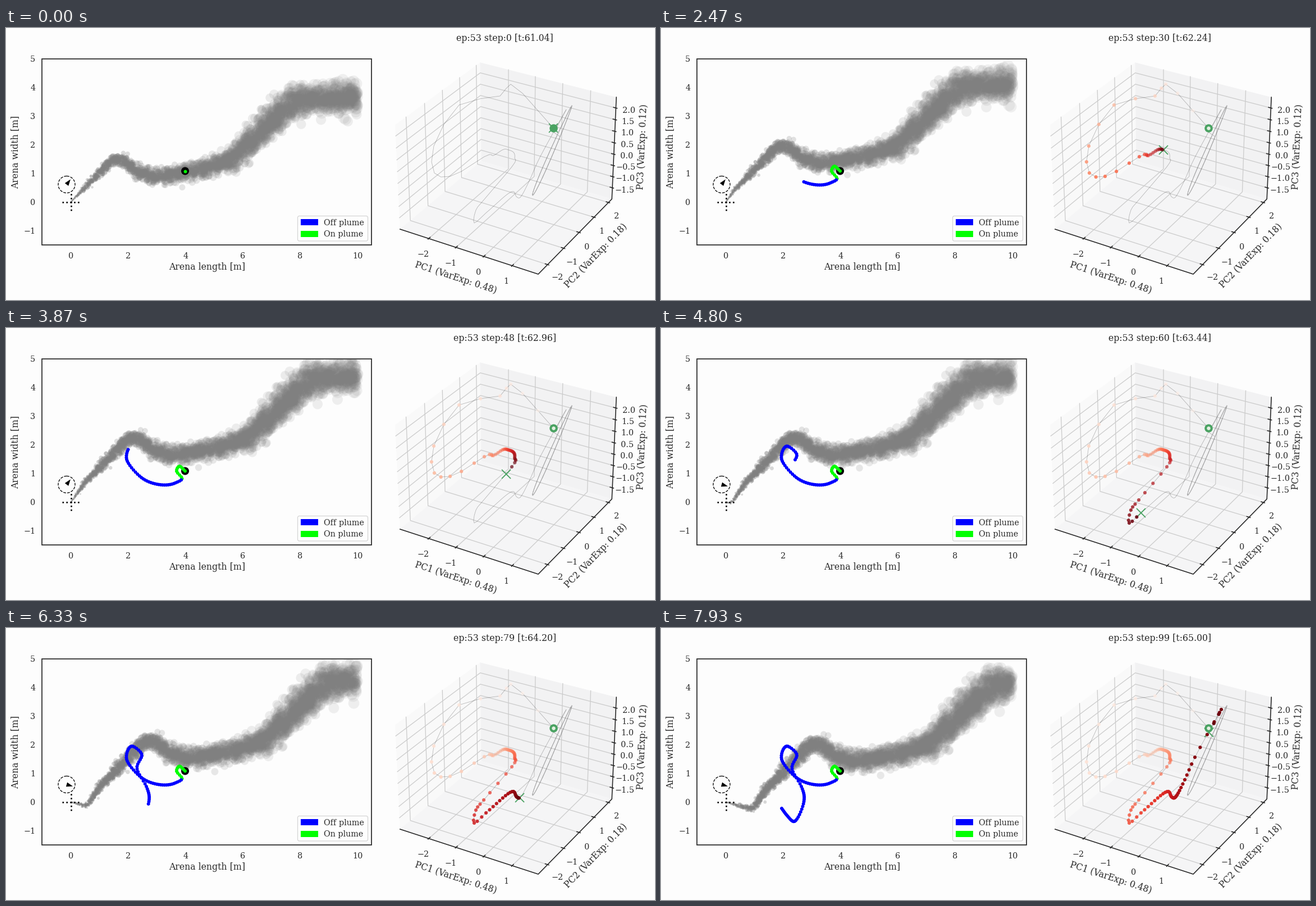
These frames come from a looping animation (1156x484 px, 8 s). A matplotlib script:

```python
import numpy as np
import matplotlib.pyplot as plt
from matplotlib.animation import FuncAnimation
from matplotlib.patches import Circle, FancyBboxPatch, Polygon, Rectangle

W, H = 1156, 484
STEPS = 100
INK, GRID, GREEN = "#262626", "#cccccc", "#4aa262"
BLUE, LIME = "#0000ff", "#00ff00"
TICK, LABEL = 14.4, 15.7

# At 72 dpi one point is one pixel, so all sizes below are pixels.
plt.rcParams["font.family"] = "DejaVu Serif"
fig = plt.figure(figsize=(W / 72, H / 72), dpi=72, facecolor="#fdfdfd")
ax = fig.add_axes([0, 0, 1, 1])
ax.set(xlim=(0, W), ylim=(H, 0))
ax.axis("off")


def label(x, y, s, size=TICK, rot=0, ha="center"):
    va = "center" if rot else "center_baseline"
    return ax.text(x, y, str(s).replace("-", "\u2212"), size=size, color=INK,
                   rotation=rot, ha=ha, va=va, zorder=9)


def curve(keys, t):
    """Smooth path through (time, x, y) keys, sampled at times t."""
    kt, *coords = np.array(keys, float).T
    i = np.clip(np.searchsorted(kt, t, "right") - 1, 0, len(kt) - 2)
    h = kt[i + 1] - kt[i]
    u = (t - kt[i]) / h
    ease = u * u * (3 - 2 * u)
    out = []
    for p in coords:
        m = np.gradient(p, kt)
        out.append(p[i] + (p[i + 1] - p[i]) * ease
                   + h * u * (1 - u) * ((1 - u) * m[i] - u * m[i + 1]))
    return np.column_stack(out)


# ---- arena ----
M = 51.05
OX, OY = 115.5, 309.5
arena = Rectangle((64, 55), 587, 330.5, fc="none", ec=INK, lw=1.7, zorder=6)
ax.add_patch(arena)
for m in range(0, 11, 2):
    label(OX + M * m, 404, m)
for m in range(-1, 6):
    label(52.5, OY - 51 * m, m, ha="right")
label(358, 423.8, "Arena length [m]", LABEL)
label(17, 221, "Arena width [m]", LABEL, 90)

for dx, dy in ((15.3, 0), (0, 15.3)):
    ax.plot([OX - dx, OX + dx], [OY + dy, OY - dy], ":", color="k", lw=2.6, zorder=4)
hub = np.array([108, 278.5])
ax.add_patch(Circle(hub, 15, fc="none", ec="k", lw=1.3, ls="--", zorder=4))
vane = ax.add_patch(Polygon([hub] * 3, fc="k", lw=0, zorder=4))

ax.add_patch(FancyBboxPatch((519.5, 334.5), 125, 44.5, boxstyle="round,pad=0,rounding_size=3",
                            fc="white", ec=GRID, lw=1.3, alpha=0.8, zorder=7))
for y, color, name in ((345.5, BLUE, "Off plume"), (366, LIME, "On plume")):
    ax.add_patch(Rectangle((525, y - 5.5), 31, 11, fc=color, lw=0, zorder=8))
    label(566, y, name, ha="left")

# ---- plume: puffs carried by one uniform wind that changes with time ----
TURN = 51
BEFORE, AFTER = np.radians(53), np.radians(-16)
shape = np.array([(OX, OY), (160, 264), (192, 233), (210, 236), (236, 257), (262, 265),
                  (320, 257), (400, 237), (500, 142), (530, 125), (760, 124)])
arc = np.r_[0, np.cumsum(np.hypot(*np.diff(shape, axis=0).T))]


def wind(angle, steps):
    return steps * np.array([np.cos(angle), -np.sin(angle)])


at_turn = wind(BEFORE, TURN)
drift_t = np.r_[-arc[::-1], TURN, STEPS]
drift_xy = np.vstack([shape[0] - shape[::-1], at_turn,
                      at_turn + wind(AFTER, STEPS - TURN)])


def drift(t):
    return np.column_stack([np.interp(t, drift_t, d) for d in drift_xy.T])


rng = np.random.default_rng(53)
birth = np.linspace(-700, STEPS, 3600)
born_at = drift(birth)
jitter = rng.normal(0, 0.22, (birth.size, 2))
growth = rng.uniform(0.26, 0.32, birth.size)
puffs = ax.scatter([], [], lw=0, zorder=2)
puffs.set_clip_path(arena)

# ---- agent track ----
steps = np.arange(STEPS)
track = curve([(0, 319, 254.5), (4, 309, 246), (8, 304, 255), (12, 313.5, 268),
               (16, 302, 275.5), (25, 272, 278.5), (34, 241, 266), (43, 215, 234),
               (52, 226, 210.5), (57, 241.5, 224), (64, 233.5, 251), (70, 250, 282),
               (78, 254.5, 309), (87, 238, 344), (94, 224, 333), (99, 215, 321)], steps)
track_colors = np.where(steps < 13, LIME, BLUE)
ax.add_patch(Circle(track[0], 7, fc="k", lw=0, zorder=3))
trail = ax.scatter([], [], s=6 ** 2, lw=0, zorder=5)

# ---- 3D box ----
ELEV, AZIM = np.radians(30), np.radians(-60)


def project(x, y, z):
    """Perspective view of a point of the box, each coordinate in -1..1."""
    x, y, z = 0.5714 * x, 0.5714 * y, 0.4286 * z
    ce, se, ca, sa = np.cos(ELEV), np.sin(ELEV), np.cos(AZIM), np.sin(AZIM)
    u = -sa * x + ca * y
    v = -se * ca * x - se * sa * y + ce * z
    w = ce * ca * x + ce * sa * y + se * z
    k = 2468 / (10 - w)
    return 893.9 + k * u, 241 - k * v


def line3d(points, **style):
    ax.plot(*zip(*[project(*p) for p in points]), **style)


square = [(-1, -1), (1, -1), (1, 1), (-1, 1)]
for axis, side, color in ((0, -1, "#f9f9f9"), (1, 1, "#f2f2f3"), (2, -1, "#f5f5f6")):
    corners = [project(*np.insert(np.array(c, float), axis, side)) for c in square]
    ax.add_patch(Polygon(corners, fc=color, lw=0, zorder=1))

grid = dict(color=GRID, lw=1.3, zorder=1.5)
edge = dict(color=INK, lw=1.6, zorder=2)
IN, OUT = 1 - 0.033, 1 + 0.017
for v in range(-2, 2):
    s = 0.236 + 0.402 * v
    line3d([(s, -1, -1), (s, 1, -1), (s, 1, 1)], **grid)
    line3d([(s, -IN, -1), (s, -OUT, -1)], **edge)
    label(841.7 + 49.2 * v, 433.5 + 16.2 * v, v)
for v in range(-2, 3):
    s = 0.068 + 0.416 * v
    line3d([(1, s, -1), (-1, s, -1), (-1, s, 1)], **grid)
    line3d([(IN, s, -1), (OUT, s, -1)], **edge)
    label(1034.5 + 26.3 * v, 388 - 27.4 * v, v)
for v in np.arange(-1.5, 2.1, 0.5):
    s = -0.099 + 0.448 * v
    line3d([(-1, -1, s), (-1, 1, s), (1, 1, s)], **grid)
    line3d([(IN, 1, s), (OUT, 1, s)], **edge)
    label(1105.3 + 1.9 * v, 226.3 - 40.6 * v, f"{v:.1f}")
line3d([(-1, -1, -1), (1, -1, -1), (1, 1, -1), (1, 1, 1)], **edge)
label(801, 444, "PC1 (VarExp: 0.48)", LABEL, -18)
label(1050.5, 405, "PC2 (VarExp: 0.18)", LABEL, 45.9)
label(1133.5, 211, "PC3 (VarExp: 0.12)", LABEL, 87.5)
title = label(888.5, 16.2, "", LABEL)

# ---- state path ----
state = curve([(0, 975, 178), (3, 899, 100), (5, 880, 121), (7, 807, 137), (9, 762, 210),
               (11, 763, 258), (13, 791, 264), (16, 852, 229), (20, 868, 227),
               (24, 884, 217), (30, 895, 217), (42, 906, 231), (47, 901, 247),
               (51, 851, 306), (54, 837, 324), (57, 834, 347), (60, 855, 329),
               (70, 904, 291), (74, 909, 300), (87, 933, 270), (91, 951, 230),
               (96, 998, 145), (99, 976, 186)], steps)
# The rest of the episode swings up and down one narrow orbit.
phase = np.linspace(0.2, 3.4, 90) * 2 * np.pi
swing = 0.5 + 0.5 * np.cos(phase)
orbit = np.column_stack([938 + 70 * swing + 5 * np.sin(phase) * (1 - 0.5 * swing),
                         298 - 160 * swing])
ax.plot(*np.vstack([state, orbit]).T, color="k", alpha=0.27, lw=0.8, zorder=3)

depth = np.interp(steps, [0, 12, 20, 44, 65], [0.6, 1, 0.6, 0.6, 1])
reds = plt.get_cmap("Reds")
dots = ax.scatter([], [], s=6.2 ** 2, lw=0, zorder=5)
cross, = ax.plot([], [], "x", ms=16, mew=1.8, color=GREEN, zorder=4)
ring, = ax.plot(*state[:1].T, "o", ms=10.5, mew=4, mec=GREEN, zorder=6)


def draw_plume(n):
    alive = birth <= n
    age = n - birth[alive]
    pos = (OX, OY) + drift([n]) - born_at[alive] + jitter[alive] * age[:, None] ** 0.64
    inside = pos[:, 0] <= OX + 10 * M
    radius = np.maximum(growth[alive] * age ** 0.55, 0.9)[inside]
    rgba = np.full((radius.size, 4), 0.5)
    rgba[:, 3] = np.minimum(1.1 / radius, 0.3)
    puffs.set_offsets(pos[inside])
    puffs.set_sizes((2 * radius) ** 2)
    puffs.set_facecolors(rgba)


def update(n):
    draw_plume(n)

    ahead = wind(BEFORE if n < TURN else AFTER, 1)
    side = 4 * np.array([ahead[1], -ahead[0]])
    vane.set_xy([hub + 11.5 * ahead, hub + side, hub - side])

    trail.set_offsets(track[:n + 1])
    trail.set_facecolors(list(track_colors[:n + 1]))

    colors = reds(np.arange(n) / max(n - 1, 1))
    colors[:, 3] = depth[:n]
    dots.set_offsets(state[:n])
    dots.set_facecolors(colors)
    cross.set_data(*state[n:n + 1].T)
    ring.set_markerfacecolor("#e4efe2" if n else GREEN)
    title.set_text(f"ep:53 step:{n} [t:{61.04 + 0.04 * n:.2f}]")


anim = FuncAnimation(fig, update, frames=STEPS, interval=80, repeat=True)
plt.show()
```
